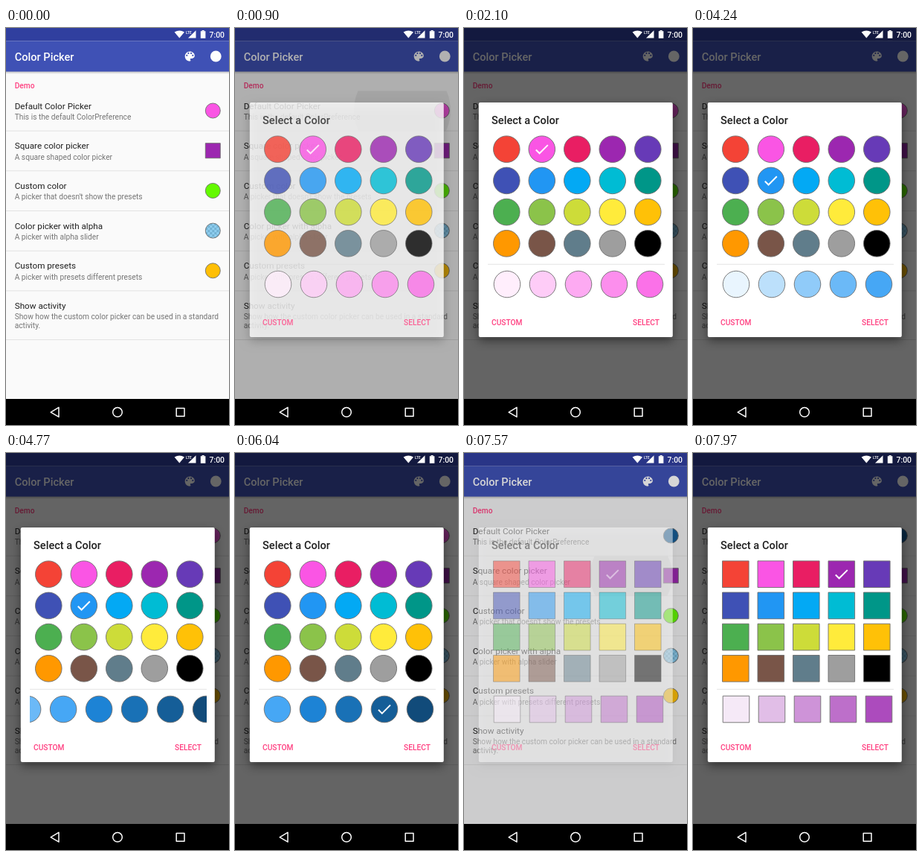
Recreate the animation shown at these times as an HTML page with a canvas. Size 300 by 533 pixels, loop 8 s.

```html
<!DOCTYPE html>
<html lang="en">
<head>
<meta charset="utf-8">
<title>Color Picker</title>
<style>
html, body { margin: 0; width: 100%; height: 100%; overflow: hidden; background: #000; }
canvas { display: block; width: 100vw; height: 100vh; }
</style>
</head>
<body>
<canvas id="stage"></canvas>
<script>
const W = 300, H = 533, LOOP = 8000;
const canvas = document.getElementById('stage');
const ctx = canvas.getContext('2d');

const ROWS = [
  ['Default Color Picker', 'This is the default ColorPreference'],
  ['Square color picker', 'A square shaped color picker'],
  ['Custom color', "A picker that doesn't show the presets"],
  ['Color picker with alpha', 'A picker with alpha slider'],
  ['Custom presets', 'A picker with presets different presets'],
  ['Show activity', 'Show how the custom color picker can be used in a standard', 'activity.']
];
const ROW_TOP = 84.5, ROW_H = 53.7;
const PRIMARY = '#3f51b5', ACCENT = '#ff4081', WHITE = '#fdfdfd';

const PRESETS = [
  '#f44336', '#fa55e4', '#e91e63', '#9c27b0', '#673ab7',
  '#3f51b5', '#2196f3', '#03a9f4', '#00bcd4', '#009688',
  '#4caf50', '#8bc34a', '#cddc39', '#ffeb3b', '#ffc107',
  '#ff9800', '#795548', '#607d8b', '#9e9e9e', '#000000'
];
const PINK = 1, PURPLE = 3, BLUE = 6;

// Positive steps mix towards white, negative ones towards black.
const SHADE_STEPS = [0.9, 0.7, 0.5, 0.333, 0.166, -0.125, -0.25, -0.375, -0.5];
const DARK_SHADE = 7;

const PICK_BLUE = 2200, SCROLL = [4270, 4970], PICK_SHADE = 5370, CLOSE = 6110;
const TAPS = [{ t: 500, row: 0, x: 225 }, { t: 7240, row: 1, x: 225 }];
const OPEN_DELAY = 260, FADE = 280;

const PALETTE = new Path2D('M12 3c-4.97 0-9 4.03-9 9s4.03 9 9 9c.83 0 1.5-.67 1.5-1.5 ' +
  '0-.39-.15-.74-.39-1.01-.23-.26-.38-.61-.38-.99 0-.83.67-1.5 1.5-1.5H16c2.76 0 5-2.24 5-5 ' +
  '0-4.42-4.03-8-9-8z');

const progress = (t, from, to) => Math.min(1, Math.max(0, (t - from) / (to - from)));
const easeOut = p => 1 - Math.pow(1 - p, 2.3);
const fling = p => easeOut(Math.pow(p, 1.4));

function shade(color, step) {
  const end = step < 0 ? 0 : 255;
  const mix = i => {
    const c = parseInt(color.slice(i, i + 2), 16);
    return Math.round(c + (end - c) * Math.abs(step));
  };
  return `rgb(${mix(1)},${mix(3)},${mix(5)})`;
}

function text(s, x, y, size, color, weight = 400, align = 'left') {
  ctx.font = `${weight} ${size}px Roboto, sans-serif`;
  ctx.textAlign = align;
  ctx.fillStyle = color;
  ctx.fillText(s, x, y);
}

function rect(x, y, w, h, color) {
  ctx.fillStyle = color;
  ctx.fillRect(x, y, w, h);
}

function disc(x, y, r, color) {
  ctx.beginPath();
  ctx.arc(x, y, r, 0, Math.PI * 2);
  ctx.fillStyle = color;
  ctx.fill();
}

function poly(points, close) {
  ctx.beginPath();
  points.forEach(([x, y]) => ctx.lineTo(x, y));
  if (close) ctx.closePath();
}

function swatchPath(x, y, r, square) {
  ctx.beginPath();
  if (square) ctx.rect(x - r, y - r, r * 2, r * 2);
  else ctx.arc(x, y, r, 0, Math.PI * 2);
}

function swatch(x, y, r, color, square) {
  swatchPath(x, y, r, square);
  ctx.fillStyle = color;
  ctx.fill();
  ctx.strokeStyle = '#6e6e6e';
  ctx.lineWidth = 0.9;
  ctx.stroke();
}

function alphaSwatch(x, y, r) {
  ctx.save();
  swatchPath(x, y, r);
  ctx.clip();
  rect(x - r, y - r, r * 2, r * 2, '#fff');
  const cell = 3;
  for (let i = 0; i < 7; i++)
    for (let j = i % 2; j < 7; j += 2)
      rect(x - r + i * cell, y - r + j * cell, cell, cell, '#c4c4c4');
  ctx.restore();
  swatch(x, y, r, 'rgba(33,160,225,0.5)');
}

function check(x, y) {
  poly([[x - 8, y + 0.8], [x - 3.2, y + 5.6], [x + 8, y - 5.6]]);
  ctx.strokeStyle = '#fff';
  ctx.lineWidth = 2;
  ctx.stroke();
}

function ripple(t, tap) {
  const age = t - tap.t;
  if (age < 0 || age > 800) return;
  const y = ROW_TOP + tap.row * ROW_H;
  const fade = 1 - progress(age, 300, 800);
  ctx.save();
  ctx.beginPath();
  ctx.rect(0, y, W, ROW_H);
  ctx.clip();
  disc(tap.x, y + 26, 10 + 55 * progress(age, 0, 400), `rgba(0,0,0,${0.08 * fade})`);
  ctx.restore();
}

function toolbar() {
  const shadow = ctx.createLinearGradient(0, 58, 0, 62);
  shadow.addColorStop(0, 'rgba(0,0,0,0.25)');
  shadow.addColorStop(1, 'rgba(0,0,0,0)');
  rect(0, 58, W, 4, shadow);
  rect(0, 0, W, 17.5, '#303f9f');
  rect(0, 17.5, W, 41, PRIMARY);
  text('Color Picker', 11.7, 43.5, 14.6, WHITE, 500);

  ctx.save();
  ctx.translate(238.5, 29.2);
  ctx.scale(0.73, 0.73);
  ctx.fillStyle = WHITE;
  ctx.fill(PALETTE);
  [[6.5, 10.5], [9.5, 6.5], [14.5, 6.5], [17.5, 10.5]].forEach(([x, y]) => disc(x, y, 1.5, PRIMARY));
  ctx.restore();
  disc(282.3, 38, 7.4, WHITE);
}

function list(t) {
  rect(0, 0, W, H, t < CLOSE ? '#fafafa' : '#f1f1f2');
  TAPS.forEach(tap => ripple(t, tap));
  text('Demo', 11.7, 81, 10.2, ACCENT, 500);

  ROWS.forEach(([title, ...lines], i) => {
    const y = ROW_TOP + i * ROW_H;
    text(title, 11.7, y + 24, 11.7, '#202020');
    lines.forEach((line, n) => text(line, 11.7, y + 38.3 + n * 12, 10.2, '#757575'));
    rect(0, i < 5 ? y + ROW_H - 0.5 : 418, W, 0.8, '#dcdcdc');
  });

  const first = t < CLOSE ? PRESETS[PINK] : shade(PRESETS[BLUE], SHADE_STEPS[DARK_SHADE]);
  [first, PRESETS[PURPLE], '#64fa00', null, '#ffbf06'].forEach((color, i) => {
    const y = 111 + i * ROW_H;
    if (color) swatch(278.3, y, 10, color, i === 1);
    else alphaSwatch(278.3, y, 10);
  });
  toolbar();
}

function dialog(t, alpha) {
  const square = t > TAPS[1].t;
  const base = square ? PURPLE : t >= PICK_BLUE ? BLUE : PINK;
  const scroll = square ? 0 : 193 * fling(progress(t, ...SCROLL));
  const shadePicked = !square && t >= PICK_SHADE;

  ctx.save();
  ctx.globalAlpha = alpha;
  ctx.save();
  ctx.shadowColor = `rgba(0,0,0,${0.45 * alpha * alpha})`;
  ctx.shadowBlur = 14 * canvas.width / W;
  ctx.shadowOffsetY = 5 * canvas.height / H;
  ctx.beginPath();
  ctx.roundRect(19.8, 100, 261, 315, 2);
  ctx.fillStyle = '#fff';
  ctx.fill();
  ctx.restore();

  text('Select a Color', 37, 129, 14.6, '#202020', 500);
  PRESETS.forEach((color, i) => {
    const x = 57.3 + (i % 5) * 47.5, y = 162.7 + Math.floor(i / 5) * 42.2;
    swatch(x, y, 17.8, color, square);
    if (i === base && !shadePicked) check(x, y);
  });
  rect(32, 316.8, 238, 0.8, '#dcdcdc');

  ctx.save();
  ctx.beginPath();
  ctx.rect(32, 322, 238, 46);
  ctx.clip();
  SHADE_STEPS.forEach((step, i) => {
    const x = 58 + i * 48 - scroll;
    swatch(x, 344, 17.8, shade(PRESETS[base], step), square);
    if (shadePicked && i === DARK_SHADE) check(x, 344);
  });
  ctx.restore();

  text('CUSTOM', 37, 398.5, 10.2, ACCENT, 500);
  text('SELECT', 263, 398.5, 10.2, ACCENT, 500, 'right');
  ctx.restore();
}

function systemBars() {
  ctx.fillStyle = WHITE;
  ctx.beginPath();
  ctx.moveTo(233.3, 13.6);
  ctx.lineTo(226.6, 5.6);
  ctx.quadraticCurveTo(233.3, 1.4, 240, 5.6);
  ctx.fill();
  text('LTE', 242, 7.8, 4.8, WHITE, 500);
  poly([[245, 13.6], [255.5, 13.6], [255.5, 3.2]], true);
  ctx.fill();
  rect(261.8, 4.2, 6.6, 9.6, WHITE);
  rect(263.6, 3, 3, 1.3, WHITE);
  text('7:00', 294, 12.7, 10.4, WHITE, 500, 'right');

  rect(0, 498, W, 35, '#000');
  ctx.strokeStyle = WHITE;
  ctx.lineWidth = 1.5;
  ctx.lineJoin = 'round';
  poly([[71, 509.4], [71, 522.2], [60.2, 515.8]], true);
  ctx.stroke();
  ctx.beginPath();
  ctx.arc(150, 515.8, 6.3, 0, Math.PI * 2);
  ctx.stroke();
  ctx.strokeRect(229.2, 510.4, 10.8, 10.8);
  ctx.lineJoin = 'miter';
}

function visibility(t) {
  const closing = t >= CLOSE && t < TAPS[1].t;
  const tap = t < TAPS[1].t ? TAPS[0] : TAPS[1];
  const start = closing ? CLOSE : tap.t + OPEN_DELAY;
  const p = progress(t, start, start + FADE);
  return closing
    ? { alpha: 1 - easeOut(p), dim: 1 - p }
    : { alpha: easeOut(p), dim: p };
}

function draw(t) {
  ctx.setTransform(canvas.width / W, 0, 0, canvas.height / H, 0, 0);
  list(t);
  const { alpha, dim } = visibility(t);
  rect(0, 0, W, 498, `rgba(0,0,0,${0.6 * dim})`);
  if (alpha > 0) dialog(t, alpha);
  systemBars();
}

function resize() {
  const scale = window.devicePixelRatio || 1;
  canvas.width = Math.round(innerWidth * scale);
  canvas.height = Math.round(innerHeight * scale);
}

const began = performance.now();
function tick() {
  draw((performance.now() - began) % LOOP);
  requestAnimationFrame(tick);
}
addEventListener('resize', resize);
resize();
tick();
</script>
</body>
</html>
```
